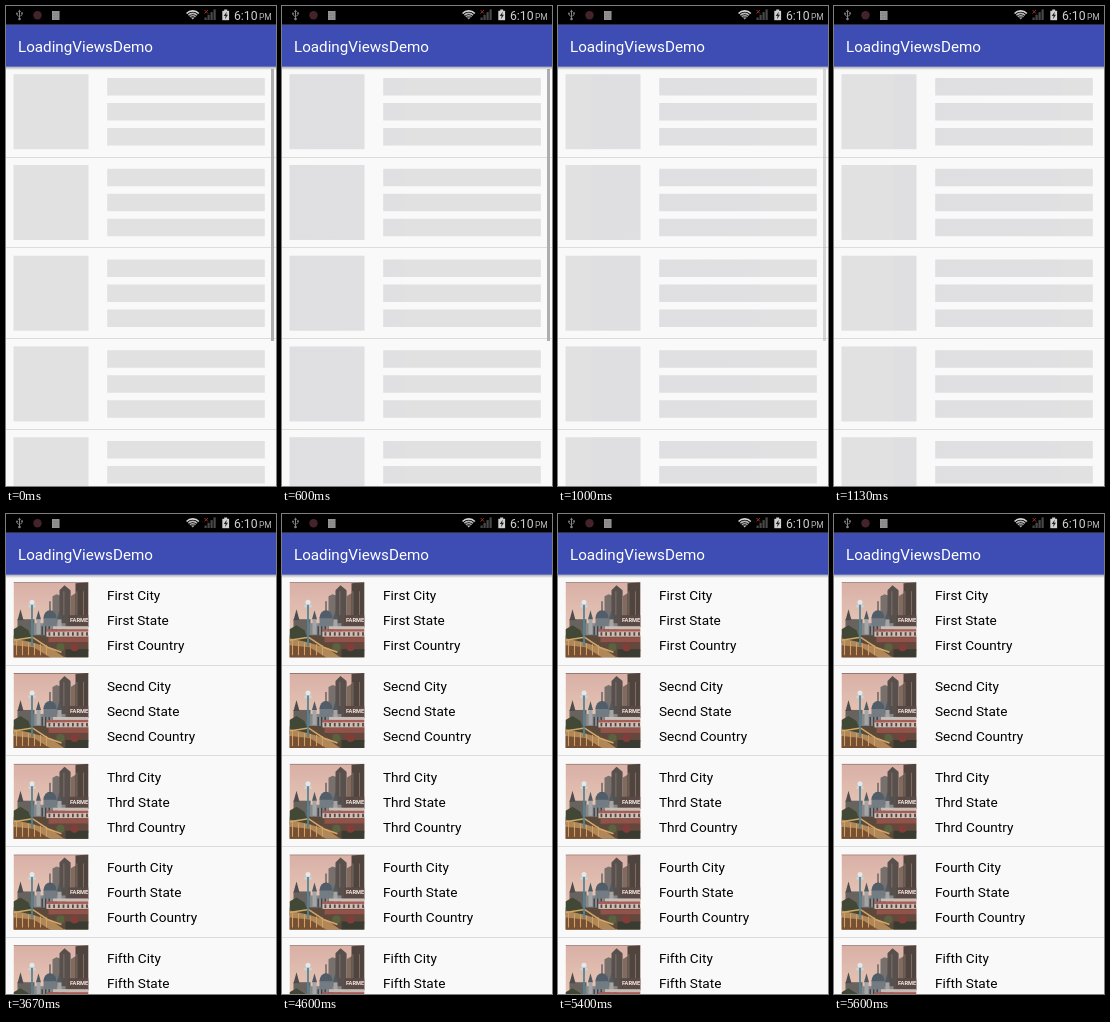
Recreate the animation shown at these times as an HTML page with a canvas. Size 270 px wide and 480 px high, loop 5670 ms.

```html
<!DOCTYPE html>
<html lang="en">
<head>
<meta charset="utf-8">
<title>Loading views</title>
<style>
html, body { margin: 0; width: 100%; height: 100%; overflow: hidden; background: #faf9fa; }
canvas { display: block; width: 100vw; height: 100vh; }
</style>
</head>
<body>
<canvas id="stage"></canvas>
<script>
const W = 270, H = 480, LOOP = 5670, LOADED = 3670;
const ROW_TOP = 61, ROW_STEP = 90.75;
const ORDINALS = ['First', 'Secnd', 'Thrd', 'Fourth', 'Fifth'];
const FIELDS = ['City', 'State', 'Country'];
const FONT = 'Roboto, sans-serif';

const canvas = document.getElementById('stage');
const ctx = canvas.getContext('2d');

function rect(x, y, w, h, color) {
  ctx.fillStyle = color;
  ctx.fillRect(x, y, w, h);
}

function poly(color, ...points) {
  ctx.fillStyle = color;
  ctx.beginPath();
  for (let i = 0; i < points.length; i += 2) ctx.lineTo(points[i], points[i + 1]);
  ctx.fill();
}

function disc(x, y, r, color) {
  ctx.fillStyle = color;
  ctx.beginPath();
  ctx.arc(x, y, r, 0, Math.PI * 2);
  ctx.fill();
}

function line(color, width, ...points) {
  ctx.strokeStyle = color;
  ctx.lineWidth = width;
  ctx.beginPath();
  for (let i = 0; i < points.length; i += 2) ctx.lineTo(points[i], points[i + 1]);
  ctx.stroke();
}

function text(str, x, y, size, color, weight = 400) {
  ctx.fillStyle = color;
  ctx.font = `${weight} ${size}px ${FONT}`;
  ctx.fillText(str, x, y);
}

function drawUsb() {
  const gray = '#858585';
  line(gray, 1, 13.5, 5, 13.5, 13);
  line(gray, 0.8, 11, 7.5, 11, 9, 13.5, 11);
  line(gray, 0.8, 16, 7, 16, 9, 13.5, 10.5);
  poly(gray, 12, 6, 13.5, 3.5, 15, 6);
  disc(13.5, 13, 1.3, gray);
  disc(11, 7.5, 0.9, gray);
  rect(15.2, 6.3, 1.6, 1.6, gray);
}

function drawWifi(active) {
  const cx = 186.7, cy = 13.6;
  const bands = [[8.7, '#d8d8d8'], [6.2, '#b5b5b5'], [3.9, '#a5a5a5']];
  for (const [r, color] of bands) {
    ctx.strokeStyle = color;
    ctx.lineWidth = 1.6;
    ctx.beginPath();
    ctx.arc(cx, cy, r, -Math.PI * 0.75, -Math.PI * 0.25);
    ctx.stroke();
  }
  poly('#c4c4c4', cx, cy, cx - 1.7, cy - 2.2, cx + 1.7, cy - 2.2);
  if (active) poly('#666', 185, 10, 189, 10, 187, 13);
}

function drawSignal() {
  for (let i = 0; i < 4; i++) {
    const h = 2.5 + i * 2.7;
    rect(198.5 + i * 3, 14 - h, 2.2, h, '#484848');
  }
  line('#a02c2c', 1, 198.5, 4, 202, 7.5);
  line('#a02c2c', 1, 202, 4, 198.5, 7.5);
}

function drawStatusBar(t) {
  rect(0, 0, W, 18.75, '#000');
  drawUsb();
  disc(31.5, 9.2, 4.2, '#45232a');
  rect(46, 5, 7.5, 9, '#989898');
  for (let i = 1; i < 4; i++) {
    rect(46 + i * 1.9, 5, 0.4, 9, '#777');
    rect(46, 5 + i * 2.25, 7.5, 0.4, '#777');
  }
  const active = (t >= 600 && t < 1600) || (t >= 3670 && t < 4600) || t >= 5600;
  drawWifi(active);
  drawSignal();
  rect(218.2, 3.5, 3, 1.5, '#d0d0d0');
  rect(216.3, 4.8, 6.8, 9.4, '#d0d0d0');
  poly('#222', 220.7, 5.8, 217.8, 10, 219.6, 10, 218.9, 13.2, 222, 8.7, 220.2, 8.7);
  text('6:10', 228, 13.8, 12.2, '#d0d0d0');
  text('PM', 253, 13.8, 8.5, '#b8b8b8');
}

function drawAppBar() {
  const shade = ctx.createLinearGradient(0, 61, 0, 64);
  shade.addColorStop(0, 'rgba(0,0,0,.28)');
  shade.addColorStop(1, 'rgba(0,0,0,0)');
  rect(0, 60.75, W, 4, shade);
  rect(0, 18.75, W, 42, '#3d4db4');
  text('LoadingViewsDemo', 12, 45.7, 15.2, '#fff');
}

// A simplified city view, 75 units square.
function drawCity(x, y) {
  ctx.save();
  ctx.translate(x, y);
  ctx.beginPath();
  ctx.rect(0, 0, 75, 75);
  ctx.clip();
  const sky = ctx.createLinearGradient(0, 0, 0, 45);
  sky.addColorStop(0, '#d9b0a6');
  sky.addColorStop(1, '#e5c4b5');
  rect(0, 0, 75, 76, sky);
  rect(0, 0, 75, 0.8, '#7d6862');

  // Towers
  poly('#77706d', 39, 45, 39, 14, 43, 12, 49, 14, 49, 45);
  poly('#57504d', 46, 45, 46, 8, 51, 3, 57, 8, 57, 45);
  poly('#806b5e', 57, 45, 57, 14, 62, 11, 64, 13, 64, 45);
  poly('#50443f', 62, 45, 62, 1, 75, 0, 75, 45);
  for (let i = 0; i < 4; i++) rect(50 + i * 6.5, 9, 0.8, 24, '#8a786d');
  rect(55, 33, 20, 12, '#5a4944');
  text('FARME', 56.5, 40, 5.7, '#f4eae4', 700);

  // Domed hall
  rect(4, 37, 17, 18, '#69635f');
  poly('#4d4d4e', 4, 38, 7, 27, 10, 38);
  rect(20, 41, 32, 14, '#85878a');
  rect(30, 35, 13, 9, '#747c83');
  ctx.fillStyle = '#515d68';
  ctx.beginPath();
  ctx.ellipse(36.5, 36, 6.5, 8, 0, Math.PI, 0);
  ctx.fill();
  line('#4b5054', 1.2, 36.5, 19, 36.5, 29);
  for (const tx of [25, 46]) {
    rect(tx - 2, 37, 4, 15, '#a6a5a5');
    poly('#4f5a61', tx - 2.5, 37, tx, 28, tx + 2.5, 37);
  }
  for (let i = 0; i < 5; i++) rect(28 + i * 3.5, 44, 1.4, 9, '#424345');

  // Street
  rect(0, 53, 75, 23, '#5b4a3b');
  poly('#414936', 0, 47, 7, 43, 15, 48, 19, 60, 0, 61);
  rect(39, 44, 36, 3, '#c7bdb7');
  rect(33, 47, 42, 2.5, '#a65b55');
  rect(33, 49.5, 42, 5, '#d1bdb3');
  for (let i = 0; i < 9; i++) rect(35 + i * 4.7, 50, 1.8, 3.5, '#514a47');
  rect(35, 55, 40, 5, '#925149');
  rect(42, 60, 33, 9, '#65483d');
  rect(52, 67, 23, 9, '#3b3c31');
  disc(47, 65, 4, '#59633f');
  disc(61, 65, 4, '#813d38');
  poly('#af8758', 0, 56, 18, 60, 38, 66, 52, 76, 0, 76);
  poly('#775033', 0, 63, 20, 65, 38, 76, 0, 76);
  line('#d5a665', 1.5, 0, 58, 19, 55, 34, 65, 48, 70);
  for (let i = 0; i < 6; i++) line('#d0a064', 1.1, 3 + i * 6, 58 + i, 3 + i * 6, 73);

  // Street lamp
  line('#538696', 1.8, 18.5, 22, 18.5, 64);
  disc(18.5, 20, 2.5, '#e3e9e8');
  disc(16, 24, 1.4, '#c5d7da');
  disc(21, 24, 1.4, '#c5d7da');
  ctx.restore();
}

function shimmerFill(t) {
  const period = 1540;
  const lead = 3 + (t % period) * 0.2;
  const fill = ctx.createLinearGradient(lead - 171, 0, lead, 0);
  fill.addColorStop(0, '#e2e1e2');
  fill.addColorStop(0.02, '#dfdee0');
  fill.addColorStop(0.98, '#e0dfe1');
  fill.addColorStop(1, '#e2e1e2');
  return fill;
}

function drawRows(t) {
  const fill = shimmerFill(t);
  ORDINALS.forEach((ordinal, i) => {
    const top = ROW_TOP + i * ROW_STEP;
    if (t < LOADED) rect(7.5, top + 7.2, 75, 75, fill);
    else drawCity(7.5, top + 7.2);
    FIELDS.forEach((field, k) => {
      const y = top + 11 + k * 25;
      if (t < LOADED) rect(101.2, y, 157.6, 17.5, fill);
      else text(`${ordinal} ${field}`, 101, Math.floor(y + 14.7), 13.6, '#000');
    });
    rect(0, Math.floor(top + 90), W, 1, '#dddcdd');
  });
}

function drawScrollbar(t) {
  const alpha = t < 870 ? 1 : t < 1000 ? 0.75 : t < 1070 ? 0.48 : t < 1130 ? 0.22 : 0;
  rect(265, 63, 3, 272, `rgba(174,173,175,${alpha})`);
}

function draw(now) {
  const t = now % LOOP;
  const w = Math.round(innerWidth * devicePixelRatio);
  const h = Math.round(innerHeight * devicePixelRatio);
  if (canvas.width !== w || canvas.height !== h) {
    canvas.width = w;
    canvas.height = h;
  }
  ctx.setTransform(w / W, 0, 0, h / H, 0, 0);
  rect(0, 0, W, H, '#faf9fa');
  drawRows(t);
  drawScrollbar(t);
  drawAppBar();
  drawStatusBar(t);
}

const start = performance.now();
function tick() {
  draw(performance.now() - start);
  requestAnimationFrame(tick);
}
tick();
</script>
</body>
</html>
```
